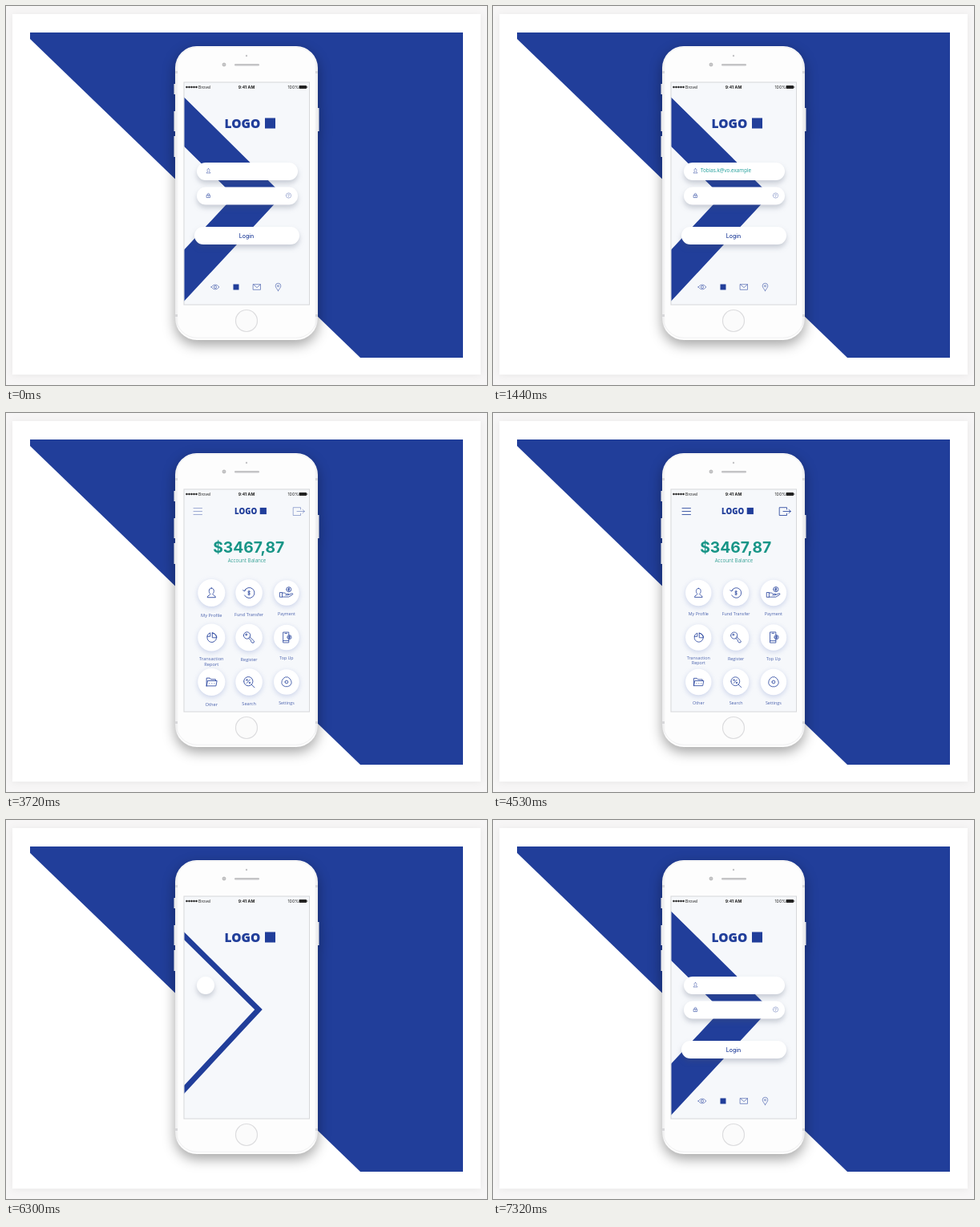
Recreate the animation shown at these times as an HTML page. Size 600 by 472 pixels, loop 7.35 s.

```html
<!DOCTYPE html>
<html lang="en">
<head>
<meta charset="utf-8">
<title>Banking app login</title>
<style>
  html, body { margin: 0; width: 100%; height: 100%; overflow: hidden; background: #f7f6f6; }
  svg { display: block; width: 600px; height: 472px; }
  text { font-family: "Open Sans", sans-serif; }
  .inter { font-family: Inter, sans-serif; }
  .blue { fill: #213e9a; }
  .line { fill: none; stroke: #2a469e; stroke-width: .85; stroke-linecap: round; stroke-linejoin: round; }
  .thin { stroke: #5a6fb4; stroke-width: .75; }
  .mid { text-anchor: middle; }
  .card { filter: drop-shadow(0 1px 5px rgba(0,0,0,.06)); }
  .phone { filter: drop-shadow(0 6px 8px rgba(0,0,0,.36)); }
  .pill { filter: drop-shadow(0 4px 3px rgba(70,80,110,.26)); }
  .disc { filter: drop-shadow(0 2px 3px rgba(125,145,205,.36)); }
  .label { font-size: 5.4px; fill: #4a62ad; }
</style>
</head>
<body>
<svg viewBox="0 0 600 472">
  <defs>
    <clipPath id="screen"><rect x="222.5" y="95.5" width="155.5" height="276"/></clipPath>
    <linearGradient id="shell">
      <stop offset="0" stop-color="#e9e9ea"/><stop offset=".025" stop-color="#fdfdfd"/>
      <stop offset=".975" stop-color="#fdfdfd"/><stop offset="1" stop-color="#e6e6e8"/>
    </linearGradient>
  </defs>
  <rect class="card" x="8" y="10" width="584" height="449" fill="#fff"/>
  <path class="blue" d="M30 33H570V438H442L30 41Z"/>

  <g class="phone">
    <path d="M210.5 97V110M210.5 131V156M210.5 162V188M389.5 127V156" stroke="#e8e8ea" stroke-width="2"/>
    <rect x="211" y="50" width="178" height="366" rx="27" fill="url(#shell)"/>
  </g>
  <rect x="212.2" y="51.2" width="175.600" height="362" rx="26" fill="none" stroke="#f0f0f1"/>
  <path d="M211 82.500h3M386 82.500h3M211 385.500h3M386 385.500h3" stroke="#d8d8da" stroke-width="3"/>
  <circle cx="300" cy="62" r="1.200" fill="#c4c4c6"/>
  <circle cx="272" cy="73" r="2" fill="#c9c9cb" stroke="#aaa" stroke-width=".7"/>
  <rect x="285" y="72" width="31" height="2.400" rx="1.200" fill="#c4c4c6"/>
  <circle cx="300" cy="392" r="13.500" fill="#fbfbfb" stroke="#dcdcde" stroke-width="1.200"/>
  <rect x="222" y="95" width="156.500" height="277" fill="#f6f8fb" stroke="#d6d7da"/>

  <g fill="#222" font-size="5.200">
    <g id="dots"></g>
    <text class="inter" x="240" y="102.900">Brovel</text>
    <text class="inter mid" x="300" y="103" font-weight="700">9:41 AM</text>
    <text class="inter" x="351.500" y="102.900">100%</text>
    <rect x="365.500" y="99" width="9.500" height="4" rx=".8"/>
    <rect x="375.400" y="100.200" width=".8" height="1.600"/>
  </g>

  <g clip-path="url(#screen)">
    <path id="band" d="M193 115.500L315 236L193 367" fill="none" stroke="#213e9a" stroke-miterlimit="10"/>
    <g id="pills"></g>
    <g id="tabs"></g>
    <g id="home"></g>
    <g id="logo">
      <text class="blue" x="-33" y="5.600" font-size="15.500" font-weight="800">LOGO</text>
      <rect class="blue" x="17.500" y="-6.500" width="13" height="13"/>
    </g>
  </g>
</svg>
<script>
const LOOP = 7350, STEP = 30, OUT = 3030, MIRROR = 9510;
const EMAIL = 'Tobias.k@vo.example', SECRET = 9;
const NS = 'http://www.w3.org/2000/svg';
const $ = id => document.getElementById(id);

function add(parent, tag, attrs = {}, text = '') {
  const el = document.createElementNS(NS, tag);
  set(el, attrs);
  el.textContent = text;
  return parent.appendChild(el);
}
function set(el, attrs) {
  for (const k in attrs) el.setAttribute(k, attrs[k]);
}
const clamp = v => Math.max(0, Math.min(1, v));
const seg = (t, a, b) => clamp((t - a) / (b - a));
const outCubic = p => 1 - (1 - p) ** 3;
const smooth = p => p * p * (3 - 2 * p);
const circle = (x, y, r) => `M${x - r} ${y}a${r} ${r} 0 1 0 ${2 * r} 0a${r} ${r} 0 1 0 ${-2 * r} 0`;
const at = (x, y, s = 1) => `translate(${x} ${y}) scale(${s})`;

for (let i = 0; i < 5; i++) add($('dots'), 'circle', { cx: 225.5 + i * 3, cy: 101, r: 1.25 });

// Login form
const person = 'M0-3.2c-2.400 0-2 3.400-.8 4.200C-1 2-3 1.800-3 3.200H3C3 1.800 1 2 .8 1C2 .2 2.400-3.200 0-3.200Z';
const lock = 'M-2-.4h4v3h-4ZM-1.200-.4v-1a1.200 1.200 0 0 1 2.400 0v1M0 .8v.6';

function makePill(x, y, w, h, enter) {
  const g = add($('pills'), 'g');
  const rect = add(g, 'rect', { class: 'pill', x: -h / 2, y: -h / 2, height: h, rx: h / 2, fill: '#fff' });
  const body = add($('pills'), 'g');
  return { x: x + h / 2, y: y + h / 2, w, h, enter, g, rect, body };
}
const user = makePill(238, 195, 126, 22, 6200);
const pass = makePill(238, 225.5, 126, 22, 6310);
const button = makePill(235, 275, 131, 22, 6400);

add(user.body, 'path', { class: 'line thin', d: person, transform: at(252.5, 205.3, .85) });
add(pass.body, 'path', { class: 'line thin', d: lock, transform: at(252.5, 236) });
add(pass.body, 'path', { class: 'line thin', d: circle(0, 0, 3.2) + 'M-1-.8a1 1 0 1 1 1 1.100v.5M0 1.900v.1',
  transform: at(352.5, 236), opacity: .6 });
const email = add(user.body, 'text', { x: 259, y: 207.3, 'font-size': 6.3, fill: '#1b9c98' });
const secret = add(pass.body, 'g', { fill: '#1b9c98' });
for (let i = 0; i < SECRET; i++) add(secret, 'circle', { cx: 260.5 + i * 3.8, cy: 236, r: 1.15 });
add(button.body, 'text', { class: 'inter blue mid', x: 300, y: 288.6, 'font-size': 7, 'font-weight': 500 }, 'Login');

const tabs = [
  [261, 'M-5 0Q0-6 5 0Q0 6-5 0Z' + circle(0, 0, 1.6)],
  [287, ''],
  [313, 'M-4.500-3.300h9v6.600h-9ZM-4.500-3.300L0 .7L4.500-3.300'],
  [339.5, 'M0 4.700C-1.500 2-3.300.5-3.300-1.400a3.300 3.300 0 0 1 6.600 0C3.300.5 1.500 2 0 4.700Z' + circle(0, -1.3, 1)]
].map(([x, d]) => {
  const el = add($('tabs'), 'g');
  if (d) add(el, 'path', { class: 'line thin', d });
  else add(el, 'rect', { class: 'blue', x: -3.5, y: -3.5, width: 7, height: 7 });
  return { x, el };
});

// Home screen
const menu = add($('home'), 'path', { class: 'line', d: 'M236 118.500h10.500M236 122.500h10.500M236 126.500h10.500' });
const leave = add($('home'), 'path', { class: 'line',
  d: 'M366.500 120v-2.300h-9.300v9.800h9.300v-2.300M362 122.500h9.300M369 120.300l2.300 2.200l-2.300 2.200' });
const balance = add($('home'), 'g', { fill: '#189587' });
add(balance, 'text', { class: 'inter mid', x: 302.7, y: 174.3, 'font-size': 19.3, 'font-weight': 700 }, '$3467,87');
add(balance, 'text', { class: 'mid', x: 300.5, y: 186.3, 'font-size': 6.2, opacity: .85 }, 'Account Balance');

const coin = (x, y, r) => circle(x, y, r) + `M${x + 1} ${y - 1}q-2-.8-2 .3t1 .7t1 .8t-2 .3M${x} ${y - 2}v4`;
const teeth = Array.from({ length: 12 }, (_, i) => {
  const a = (i + .5) * Math.PI / 6, r = i % 4 < 2 ? 6.6 : 6.2;
  return (i ? 'L' : 'M') + (r * Math.cos(a)).toFixed(2) + ' ' + (r * Math.sin(a)).toFixed(2);
}).join('') + 'Z';
const items = [
  ['My Profile', 'M0-5.800c-4 0-3.500 5.800-1.300 7.300C-1.500 3-5 2.800-5 5.600H5C5 2.800 1.500 3 1.300 1.500C3.500 0 4-5.800 0-5.800Z'],
  ['Fund Transfer', 'M-5.500-3a6.500 6.500 0 1 1 0 6M-7.500-3.300l2 1.300l1.500-2M1.200-1.600q-2.400-1-2.400.3t1.200 1.300t1.200 1.400t-2.400.3M0-3v6'],
  ['Payment', coin(3, -4.5, 3.2) + 'M-8.500-.5h2.800v6h-2.800ZM-5.700 0h3l2.500 1.400h3q1 1.200-1 1.500h-3M2.800 2.500l4.500-1.800q1.700.3.700 1.500L3 5.300h-8.700'],
  ['Transaction|Report', 'M1-5.500a5.700 5.700 0 1 1-6.200 4.500M1-5.500V.3h5.500A5.700 5.700 0 0 0 1-5.500M-5.300-1.600a5.700 5.700 0 0 1 3.800-4v4Z'],
  ['Register', circle(-2.5, -2.5, 4.2) + circle(-3.3, -3.5, 1) + 'M.8-.8L6.500 4.700L5.800 6.600H3.800L2.500 5V3.500L-.5.9'],
  ['Top Up', 'M3-3v-3.800h-7.500v13.600H3V2.800M-4.500 4.300H3M-2-5.300h2.500' + coin(3.7, -.3, 2.7)],
  ['Other', 'M-6 4.800v-9.600h4l1.300 1.600H5v1.700M-6 4.800H5.500l1.200-6.300H-4.700L-6 4.800M-2.500 1.700h.1M.5 1.700h.1M3.500 1.700h.1'],
  ['Search', circle(-.8, -.8, 5.6) + 'M3.300 3.300L6.800 6.800M1.200-3L-2.800 1.400' + circle(-2.5, -2.5, .8) + circle(1, 1, .8)],
  ['Settings', teeth + circle(0, 0, 2)]
].map(([label, d], i) => {
  const col = i % 3, row = Math.floor(i / 3);
  const el = add($('home'), 'g');
  add(el, 'circle', { class: 'disc', r: 16.2, fill: '#fff' });
  add(el, 'path', { class: 'line', d, transform: 'scale(.97)' });
  const lines = label.split('|');
  lines.forEach((s, j) => add(el, 'text', {
    class: 'label mid', y: (lines.length > 1 ? 27.2 : 28.3) + j * 6.5
  }, s));
  return { el, x: 256.3 + col * 46.8, y: 224 + row * 55.5, start: [3270, 3320, 3490][col] };
});

function drawPill(p, t) {
  let grow = 1, pop = 1, ink = 1;
  if (t >= OUT && t < 5000) {
    const isButton = p === button;
    grow = isButton ? 1 - seg(t, OUT, 3180) : .6 * (1 - seg(t, OUT, 3150));
    pop = isButton ? 1 - seg(t, 3180, 3260) : 1 - seg(t, 3150, 3240);
    ink = isButton ? 1 - seg(t, OUT, 3120) : t < 3060 ? .06 : 0;
  } else if (t >= 5000) {
    pop = outCubic(seg(t, p.enter, p.enter + 90));
    grow = smooth(seg(t, p.enter + 100, p.enter + 450));
    ink = seg(t, p.enter + 400, p.enter + 620);
  }
  set(p.g, { transform: at(p.x, p.y, pop), visibility: pop > 0 ? 'visible' : 'hidden' });
  set(p.rect, { width: p.h + (p.w - p.h) * grow });
  set(p.body, { opacity: ink });
}

function spring(u) {
  return u <= 0 ? 0 : 1 - Math.exp(-6.5 * u) * Math.cos(20.9 * u);
}

function draw(t) {
  const leaving = t < 5000;
  const home = t < 4760 ? t : MIRROR - t; // the home screen leaves the way it came

  const typed = Math.round(seg(t, 450, 1410) * EMAIL.length);
  email.textContent = leaving ? EMAIL.slice(0, typed) : '';
  const marks = leaving ? Math.ceil(seg(t, 2160, 2700) * SECRET) : 0;
  [...secret.children].forEach((c, i) => set(c, { opacity: i < marks ? 1 : 0 }));

  [user, pass, button].forEach(p => drawPill(p, t));
  const width = leaving ? 1 - smooth(seg(t, OUT, 3270)) : outCubic(seg(t, 6240, 7320));
  set($('band'), { 'stroke-width': 43.6 * width, visibility: width > 0 ? 'visible' : 'hidden' });
  tabs.forEach(({ x, el }, i) => {
    const p = leaving ? 1 - seg(t, OUT + i * 20, 3180 + i * 20) : smooth(seg(t, 6600 + i * 80, 6820 + i * 80));
    set(el, { transform: at(x, 350, .5 + .5 * p), opacity: p });
  });

  const rise = smooth(seg(home, 3230, 3600));
  set($('logo'), { transform: at(305.5 + .2 * rise, 146 - 24 * rise, 1 - .37 * rise) });
  const side = seg(home, 3480, 3960);
  set(menu, { transform: at(-4 * (1 - side), 0), opacity: side });
  set(leave, { transform: at(2 * (1 - side), 0), opacity: side });
  const shown = smooth(seg(home, 3300, 3630));
  set(balance, { opacity: shown, transform: at(0, 6 * (1 - shown)) });
  for (const { el, x, y, start } of items) {
    const u = (home - start) / 1000;
    set(el, { transform: at(x, y, spring(u)), opacity: clamp(u / .1) });
  }
}

const begin = performance.now();
function tick() {
  const t = (performance.now() - begin) % LOOP;
  draw(Math.floor(t / STEP) * STEP);
  requestAnimationFrame(tick);
}
tick();
</script>
</body>
</html>
```
